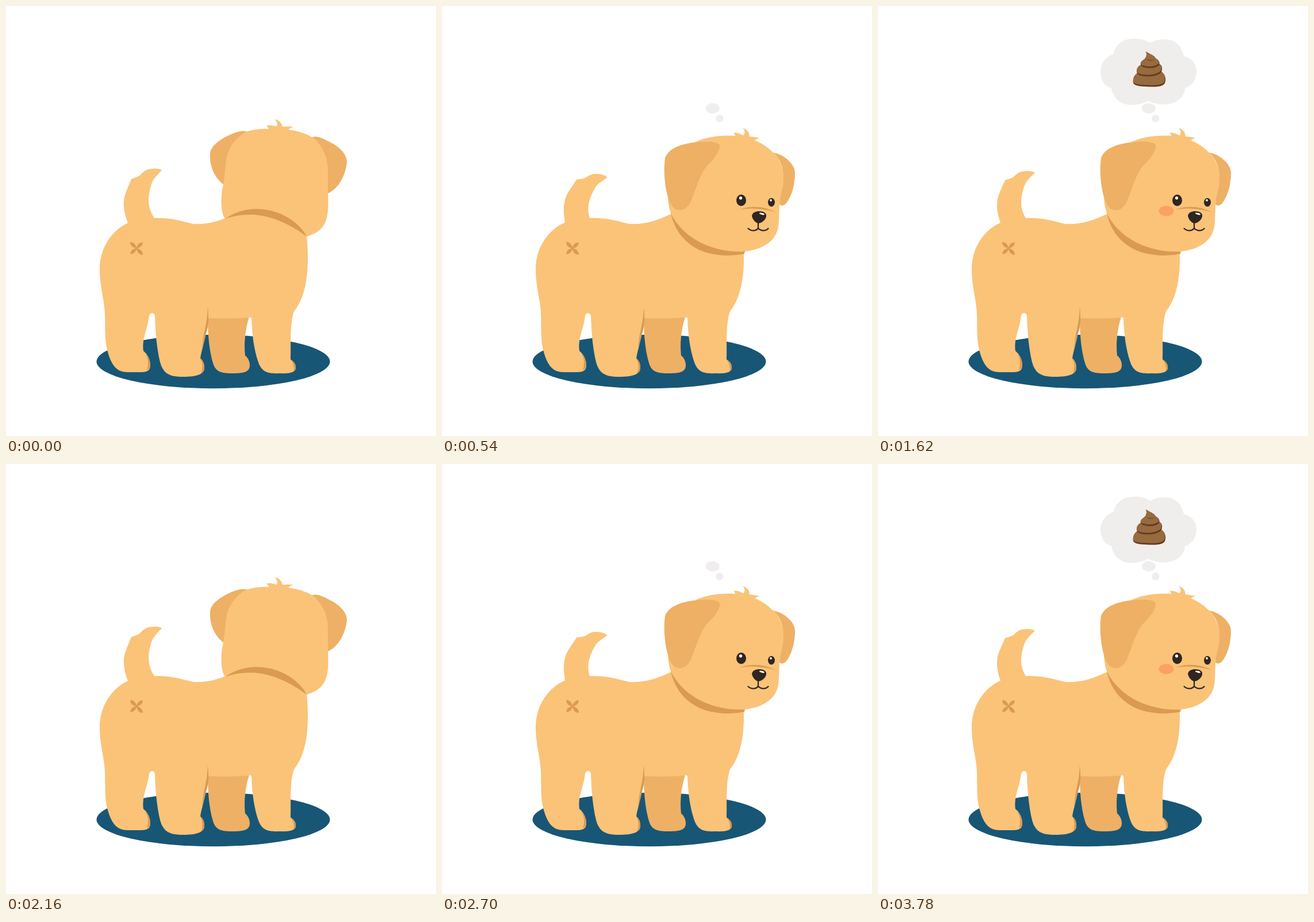
These frames come from a looping animation (748x748 px, 4320 ms). An HTML page with a canvas:

```html
<!DOCTYPE html>
<html lang="en">
<head>
<meta charset="utf-8">
<title>Thinking puppy</title>
<style>
html, body { margin: 0; width: 100%; height: 100%; overflow: hidden; background: #fff; }
canvas { display: block; width: 748px; height: 748px; }
</style>
</head>
<body>
<canvas id="stage" width="748" height="748"></canvas>
<script>
const ctx = document.getElementById('stage').getContext('2d');
const STEP = 270;
const CYCLE = 8;

const FUR = '#fac378', SHADE = '#eeb064', DARK = '#da9a51', INK = '#2f2522';
const MAT = '#185676', CLOUD = '#f0eded', BROWN = '#976a3f', UMBER = '#633b1e';

function fill(d, color) {
  ctx.fillStyle = color;
  ctx.fill(new Path2D(d));
}

function oval(x, y, rx, ry, color, turn = 0) {
  ctx.fillStyle = color;
  ctx.beginPath();
  ctx.ellipse(x, y, rx, ry, turn, 0, Math.PI * 2);
  ctx.fill();
}

function posed(x, y, degrees, scale, draw) {
  ctx.save();
  ctx.translate(x, y);
  ctx.rotate(degrees * Math.PI / 180);
  ctx.scale(scale, scale);
  draw();
  ctx.restore();
}

// The tail swings around its root on the rump.
function drawTail(degrees, scale) {
  posed(235, 378, degrees, scale, () => fill(
    'M-19 18 L-22 -1 C-28 -18 -29 -30 -27 -43 C-24 -54 -18 -65 -14 -75 ' +
    'Q-6 -77 0 -80 Q9 -89 15 -90 Q30 -93 38 -88 ' +
    'C29 -79 23 -74 20 -66 C16 -55 14 -46 14 -36 Q14 -22 22 -9 L22 16 Z', FUR));
}

function drawBody() {
  fill('M351 541 C351 580 355 605 361 624 C366 637 376 639 395 639 ' +
    'C415 639 424 636 424 625 C424 616 419 610 416 608 C414 590 415 566 423 541 Z', SHADE);

  fill('M213 377 C185 389 163 420 163 458 C163 489 171 510 172 535 ' +
    'C173 560 171 582 177 602 C184 626 193 637 212 637 L235 637 ' +
    'C247 637 251 633 251 625 C251 612 244 604 239 600 ' +
    'C236 577 247 561 249 538 Q254 530 259 538 C260 573 263 596 267 615 ' +
    'C272 639 283 645 308 645 C332 645 345 641 345 629 C345 621 342 616 338 613 ' +
    'C340 597 350 573 351 543 C370 544 400 544 421 542 Q424 540 427 543 ' +
    'C428 575 432 598 438 617 C444 636 454 640 475 639 ' +
    'C497 640 505 636 504 628 C503 621 499 617 495 615 ' +
    'C496 588 493 555 501 531 C519 509 525 475 525 440 Q525 418 523 400 ' +
    'Q500 350 450 345 L398 362 C372 374 350 381 325 379 ' +
    'C298 372 282 368 257 369 Z', FUR);

  fill('M351 524 Q354 548 350 563 Q344 582 341 600 Q342 578 346 562 Q350 546 351 524 Z', DARK);
  fill('M242 604 C247 609 251 616 251 624 Q251 632 245 633 Q251 618 242 604 Z', DARK);
  fill('M338 613 C343 617 346 624 345 630 Q345 637 339 639 Q345 627 338 613 Z', DARK);
  fill('M495 615 C501 618 505 624 504 629 Q504 634 500 636 Q503 625 495 615 Z', DARK);
}

function drawCross() {
  for (const [x, y] of [[11, 11.5], [-11, 10], [-11, -11], [11, -10.5]]) {
    const px = -y * 0.42, py = x * 0.42;
    const mx = x * 0.55, my = y * 0.55;
    fill(`M227 421.5 Q${227 + mx + px} ${421.5 + my + py} ${227 + x} ${421.5 + y} ` +
      `Q${227 + mx - px} ${421.5 + my - py} 227 421.5 Z`, DARK);
  }
  oval(227, 421.5, 2.4, 2.4, DARK);
}

function drawTuft(x, y, degrees) {
  posed(x, y, degrees, 1, () => fill(
    'M-10 19 Q-10 14 -14 11 Q-5 9 3 13 ' +
    'Q8 7 0 0 Q12 2 14 13 Q23 12 33 13 Q26 15 24 19 L10 24 Z', FUR));
}

function drawBackHead() {
  fill('M419 218 Q409 216 397 221 C376 229 356 242 355 257 ' +
    'C354 280 363 299 379 311 L400 280 Z', SHADE);
  fill('M533 228 C543 225 556 233 568 239 C582 247 593 259 593 271 ' +
    'C591 295 578 318 560 326 L545 280 Z', SHADE);
  fill('M417 219 Q435 213 458 214 L490 215 Q516 218 534 229 ' +
    'C551 243 560 265 560 285 L560 325 C561 348 561 364 555 377 ' +
    'C549 390 538 396 524 401 L381 370 C373 359 373 330 378 311 ' +
    'C381 292 381 283 383 268 C386 248 397 231 417 219 Z', FUR);
  drawTuft(467, 197, 0);
  fill('M381 370 C405 354 431 350 456 355 C488 361 514 382 523 401 ' +
    'C495 380 463 365 430 363 Q404 362 381 370 Z', DARK);
}

function drawFace() {
  oval(520.5, 338, 8.5, 10, INK);
  oval(519.5, 334, 2.6, 2.7, '#fff');
  oval(573, 341.5, 6, 7.6, INK);
  oval(572, 338, 1.9, 2.1, '#fff');
  fill('M517 354 Q551 343 581 359 Q550 349 517 354 Z', DARK);

  fill('M539 365 C540 359 546 357 552 357 C559 357 565 360 564 366 ' +
    'C563 372 556 378 550 378 C545 377 540 371 539 365 Z', INK);
  oval(556.5, 361.5, 4.6, 1.5, '#fff', 0.25);
  ctx.strokeStyle = INK;
  ctx.lineWidth = 2.2;
  ctx.lineCap = 'round';
  ctx.stroke(new Path2D('M550 377 V387 M532.5 387 C538 392 546 392 550 386.5 C555 392 563 392 567.5 387'));
}

function drawFrontHead(blush) {
  fill('M398 361 C405 392 425 418 460 429 Q495 438 526 431 L527 425 L470 400 Z', DARK);
  fill('M440 237 C457 229 480 224 512 226 L545 234 Q562 241 576 255 ' +
    'C592 270 596 294 594 311 C592 326 587 335 587 348 L586 372 ' +
    'C586 390 580 403 568 412 C556 421 543 425 527 427 ' +
    'C483 430 424 412 398 361 Q392 343 393 325 L410 260 Z', FUR);
  fill('M576 255 C596 258 614 276 614 290 C614 316 606 334 598 344 ' +
    'Q592 350 587 345 C588 328 594 319 594 302 C594 281 589 267 576 255 Z', SHADE);
  fill('M441 237 C458 235 483 235 483 243 C483 256 470 269 460 279 ' +
    'C447 296 439 327 433 340 C427 352 419 356 411 355 ' +
    'C399 354 393 335 390 320 C386 298 386 279 388 264 C396 246 417 240 441 237 Z', SHADE);
  drawTuft(523, 212, 9);
  if (blush) {
    ctx.globalAlpha = blush;
    oval(501.5, 356.5, 13, 9, '#fd9c61');
    ctx.globalAlpha = 1;
  }
  drawFace();
}

function drawCloud() {
  fill('M474 64 C462 57 451 56 441 57 C423 58 412 71 410 83 ' +
    'C395 88 387 101 387 114 C387 130 395 140 406 143 ' +
    'C409 162 424 172 441 172 Q458 172 470 165 Q484 172 500 171 ' +
    'C519 170 533 159 534 143 C546 139 554 128 554 114 ' +
    'C554 99 545 91 532 87 C528 69 517 58 499 58 Q484 57 474 64 Z', CLOUD);
}

function drawSwirl() {
  const layers = [
    'M452 117 C445 119 443 128 444 134 C447 140 460 140 473 140.5 ' +
      'C488 141 497 139 499 134 C502 126 499 119 494 115 Z',
    'M456 103 C450 106 448 115 452 119 Q459 123 473 122.5 Q488 121 493 115 C496 107 493 100 486 100 Z',
    'M466 79 C469 87 465 92 460 95 C455 99 456 104 461 106 C470 109 482 109 489 103 ' +
      'C491 97 488 94 483 91 C480 85 473 84 466 79 Z'
  ];
  for (const d of layers) {
    const shape = new Path2D(d);
    ctx.fillStyle = UMBER;
    ctx.fill(shape);
    ctx.save();
    ctx.clip(shape);
    ctx.translate(-0.8, -2.8);
    fill(d, BROWN);
    ctx.restore();
  }
  fill('M467 93 Q475 98 484 92 Q478 95 473 94 Z', UMBER);
}

function tailPose(step) {
  if (step < 2) return [-2, 1.035];
  if (step < 4) return [10, 1];
  return step === 5 ? [12, 1.02] : [0, 1];
}

function draw(time) {
  const step = Math.floor(time / STEP) % CYCLE;
  ctx.fillStyle = '#fff';
  ctx.fillRect(0, 0, 748, 748);

  oval(360.5, 618.5, 203, 46.7, MAT);
  drawTail(...tailPose(step));
  drawBody();
  drawCross();

  if (step < 2) drawBackHead();
  else drawFrontHead(step < 4 ? 0 : Math.min(0.9, 0.6 + (step - 4) * 0.15));

  if (step >= 1) oval(482.8, 195.7, 6.6, 6.5, CLOUD);
  if (step >= 2) oval(470.8, 178, 12, 9, CLOUD);
  if (step >= 3) {
    drawCloud();
    drawSwirl();
  }
}

const start = performance.now();
function tick() {
  draw(performance.now() - start);
  requestAnimationFrame(tick);
}
tick();
</script>
</body>
</html>
```
